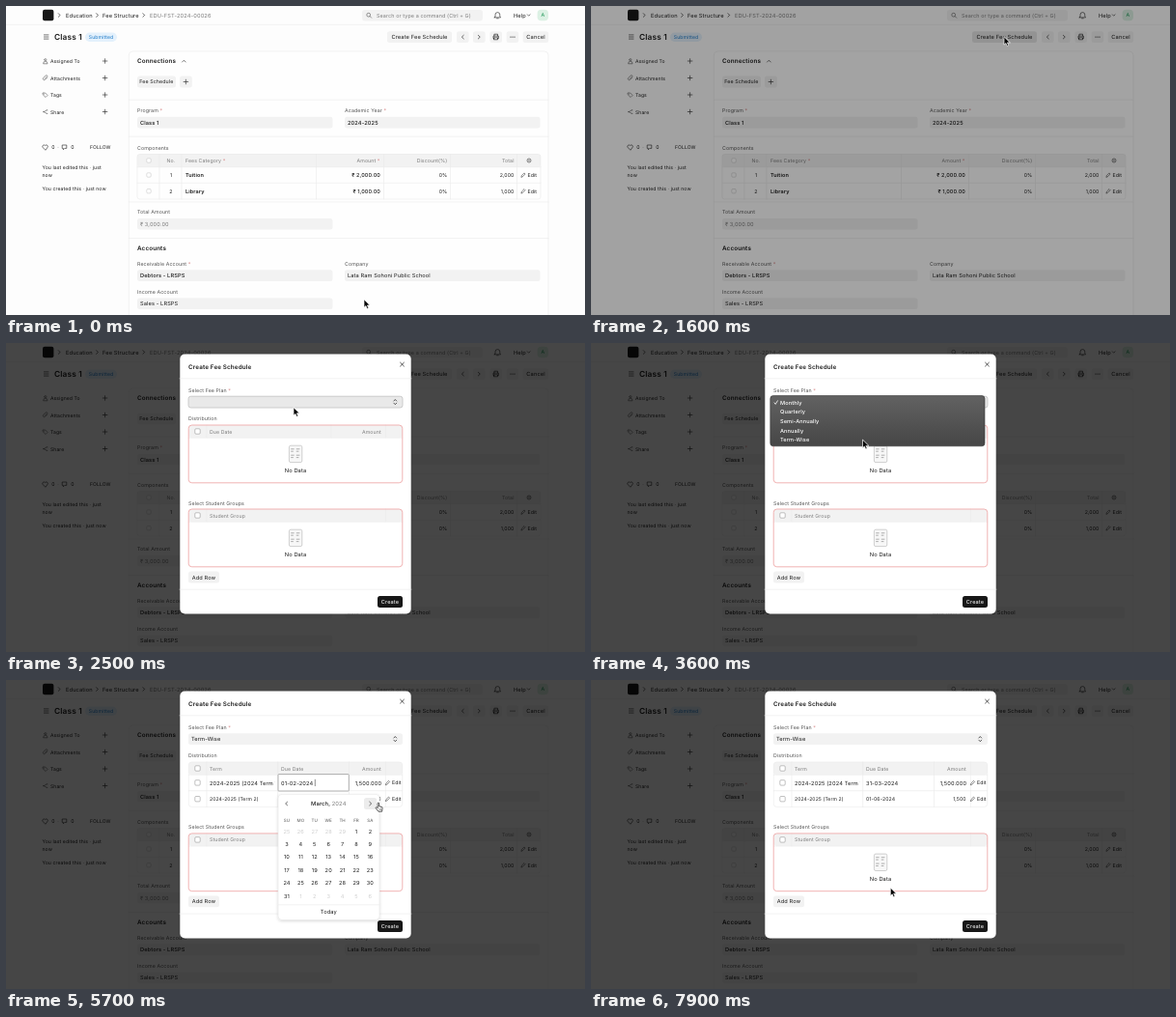
These frames come from a looping animation (600 px wide and 320 px high, 8000 ms). An HTML page:

```html
<!DOCTYPE html>
<html lang="en">
<head>
<meta charset="utf-8">
<title>Create Fee Schedule</title>
<style>
  html, body { margin: 0; width: 100%; height: 100%; overflow: hidden; background: #fdfdfd; }
  svg { display: block; width: 600px; height: 320px; }
  text { font-family: Inter, "Noto Sans", sans-serif; letter-spacing: .02em; text-rendering: geometricPrecision; white-space: pre; }
</style>
</head>
<body>
<svg id="stage" viewBox="0 0 600 320" xmlns="http://www.w3.org/2000/svg"></svg>
<script>
const INK = '#1c1c1c', MUTED = '#7c7c7c', LABEL = '#525252';
const FILL = '#f2f2f2', LINE = '#e9e9e9', PINK = '#eeA0a0';
const LOOP = 8000, STEP = 100;

// Drawing helpers, each returning SVG markup
const text = (x, y, s, size = 5.25, fill = INK, weight = 400, anchor = 'start') =>
  `<text x="${x}" y="${y}" font-size="${size}" fill="${fill}" font-weight="${weight}" text-anchor="${anchor}">${s}</text>`;
const right = (x, y, s, size, fill, weight) => text(x, y, s, size, fill, weight, 'end');
const mid = (x, y, s, size, fill, weight) => text(x, y, s, size, fill, weight, 'middle');
const box = (x, y, w, h, fill = FILL, r = 2.5, stroke = 'none', sw = .6) =>
  `<rect x="${x}" y="${y}" width="${w}" height="${h}" rx="${r}" fill="${fill}" stroke="${stroke}" stroke-width="${sw}"/>`;
const path = (d, stroke = INK, sw = .6, fill = 'none') =>
  `<path d="${d}" stroke="${stroke}" stroke-width="${sw}" fill="${fill}" stroke-linecap="round" stroke-linejoin="round"/>`;
const group = (id, body, attrs = '') => `<g id="${id}" ${attrs}>${body}</g>`;
const star = ' <tspan fill="#d98c8c">*</tspan>';
const hline = (x1, x2, y) => path(`M${x1} ${y}H${x2}`, LINE, .6);
const vline = (x, y1, y2) => path(`M${x} ${y1}V${y2}`, LINE, .6);
const plus = (x, y, r = 2.3) => path(`M${x - r} ${y}h${2 * r}M${x} ${y - r}v${2 * r}`, INK, .6);
const chevron = (x, y, dx, stroke = INK) => path(`M${x - dx / 2} ${y - 1.8}l${dx} 1.8l${-dx} 1.8`, stroke, .65);
const check = (x, y, s, stroke = '#8d8d8d') => box(x - s / 2, y - s / 2, s, s, '#fff', 1.1, stroke, .55);
const label = (x, y, s) => text(x, y, s, 5.25, LABEL);
const edit = (x, y) =>
  path(`M${x - 2} ${y + 2}l.4 -1.5l2.6 -2.6l1.1 1.1l-2.6 2.6z`, INK, .5) + text(x + 4.5, y + 2, 'Edit', 5.2);
const field = (x, y, s, fill = INK, weight = 400) =>
  box(x, y, 202.5, 11.6) + text(x + 3, y + 7.9, s, 5.65, fill, weight);

function header() {
  return box(38, 3.8, 11.4, 11.4, '#171717', 2) +
    chevron(55.2, 9.5, 1.8) + text(62, 11.6, 'Education', 5.7) +
    chevron(94.5, 9.5, 1.8) + text(100, 11.6, 'Fee Structure', 5.7) +
    chevron(142.8, 9.5, 1.8) + text(149, 11.6, 'EDU-FST-2024-00026', 5.7, MUTED) +
    box(369, 4, 125, 11.4, FILL, 3) +
    `<circle cx="375.7" cy="9.2" r="1.9" fill="none" stroke="${LABEL}" stroke-width=".6"/>` +
    path('M377.1 10.6l1.6 1.6', LABEL) + text(384, 11.6, 'Search or type a command (Ctrl + G)', 5.4, MUTED) +
    path('M507 10.9v-1.9a2.3 2.3 0 0 1 4.8 0v1.9l.8 1h-6.4zM508.6 12.8h1.6') +
    text(526, 11.6, 'Help', 5.7) + path('M540.3 8.8l1.4 1.4l1.4 -1.4') +
    box(550.6, 3.8, 11.4, 11.4, '#dcf1e4', 4) + mid(556.3, 11.4, 'A', 5.2, '#2f9e63', 500) +
    hline(0, 600, 19.3);
}

function titleBar() {
  const iconButtons = [467, 484, 501.4, 518.6].map(x => box(x, 26.2, 12.6, 11.8)).join('');
  const dots = [-2, 0, 2].map(d => `<circle cx="${525 + d}" cy="32.1" r=".55" fill="${INK}"/>`).join('');
  return [29.9, 32, 34.1].map(y => path(`M39.4 ${y}h4.6`)).join('') +
    text(50, 35.2, 'Class 1', 8.3, INK, 600) +
    box(82, 27.6, 33, 9.4, '#e4f1fc', 4.7) + mid(98.5, 34.1, 'Submitted', 5.1, '#1a78c8', 420) +
    group('createButton', box(395, 26.2, 67, 11.8)) + mid(428.5, 34.1, 'Create Fee Schedule', 5.7, INK, 420) +
    iconButtons + chevron(473.3, 32.1, -1.9) + chevron(490.3, 32.1, 1.9) +
    path('M505.9 31v-1.8h3.6v1.8M505.9 33.6h-.9v-2.5h5.4v2.5h-.9M505.9 32.8h3.6v2h-3.6z', INK, .65) + dots +
    box(535.6, 26.2, 26.6, 11.8) + mid(549, 34.1, 'Cancel', 5.7, INK, 420);
}

function sidebar() {
  const icons = [
    'M38.6 59.4a2.2 2.2 0 0 1 4.4 0zM39.7 55.7a1.1 1.1 0 1 0 2.2 0a1.1 1.1 0 1 0 -2.2 0',
    'M42.8 74l-2.3 2.3a1.2 1.2 0 0 1 -1.8 -1.8l2.6 -2.6a.8 .8 0 0 1 1.2 1.2l-2.3 2.3',
    'M38.4 90h2.2l2.5 2.5l-2 2l-2.7 -2.5zM39.5 91.2h.1',
    'M39.2 109.6l3 -1.7M39.2 109.6l3 1.7M38.4 109.6h.8M42.2 107.9h.7M42.2 111.3h.7'
  ];
  const rows = ['Assigned To', 'Attachments', 'Tags', 'Share'].map((s, i) => {
    const y = 57 + 17.5 * i;
    return path(icons[i], LABEL) + text(46, y + 2, s, 5.05) + plus(102.6, y);
  }).join('');
  return rows + path('M40.6 149l-2.4 -2.5a1.5 1.5 0 0 1 2.4 -2a1.5 1.5 0 0 1 2.4 2z') +
    text(47.2, 148, '0', 5.2) + text(53.3, 148, '·', 5.2) +
    path('M58.6 144h4.2v3.4h-2l-1.4 1.4v-1.4h-.8z') + text(67.3, 148, '0', 5.2) +
    text(87, 148, 'FOLLOW', 5) +
    text(37.5, 169, 'You last edited this · just', 5.1) + text(37.5, 176.8, 'now', 5.1) +
    text(37.5, 191, 'You created this · just now', 5.1);
}

function components() {
  const row = (y, n, name, amount, total) =>
    check(148, y, 4.4, '#c4c4c4') + mid(171, y + 2, n, 5.2) + text(186, y + 2, name, 5.5, INK, 600) +
    right(388, y + 2, '₹ ' + amount, 5.5, INK, 500) + right(457.3, y + 2, '0%', 5.2) +
    right(526.5, y + 2, total, 5.2) + edit(536, y);
  return label(136, 148.6, 'Components') +
    box(136, 153.5, 418, 13.2, FILL, 2) + box(136, 153.5, 418, 46.5, 'none', 2.5, LINE) +
    [159, 182, 321.5, 391.5, 460.5, 529.5].map(x => vline(x, 153.5, 200)).join('') +
    hline(136, 554, 166.7) + hline(136, 554, 183.3) +
    check(148, 160, 4.4, '#c4c4c4') + mid(171, 162, 'No.', 5.2, MUTED) +
    text(186, 162, 'Fees Category' + star, 5.2, MUTED) + right(387.5, 162, 'Amount' + star, 5.2, MUTED) +
    right(457.3, 162, 'Discount(%)', 5.2, MUTED) + right(526.5, 162, 'Total', 5.2, MUTED) +
    `<circle cx="542" cy="160" r="2" fill="none" stroke="${LABEL}" stroke-width=".7"/><circle cx="542" cy="160" r=".7" fill="${LABEL}"/>` +
    row(175, '1', 'Tuition', '2,000.00', '2,000') + row(191.7, '2', 'Library', '1,000.00', '1,000');
}

function card() {
  return box(127.3, 47, 434.7, 290, '#fefefe', 4, LINE) +
    [97.2, 135.2, 203, 240.6].map(y => hline(127.3, 562, y)).join('') +
    text(136, 59.2, 'Connections', 6.3, INK, 600) + path('M182.6 58l1.8 -1.8l1.8 1.8') +
    box(136, 72.6, 40, 11.8) + mid(155.8, 80.4, 'Fee Schedule', 5.3) +
    box(180, 72.6, 12.8, 11.8) + plus(186.4, 78.5) +
    label(136, 110, 'Program' + star) + field(136, 114.8, 'Class 1', INK, 500) +
    label(351, 110, 'Academic Year' + star) + field(351, 114.8, '2024-2025', INK, 500) +
    components() +
    label(136, 215.4, 'Total Amount') + field(136, 220, '₹ 3,000.00', MUTED) +
    text(136, 252.8, 'Accounts', 6.3, INK, 600) +
    label(136, 269, 'Receivable Account' + star) + field(136, 273.3, 'Debtors - LRSPS', INK, 500) +
    label(351, 269, 'Company') + field(351, 273.3, 'Lata Ram Sohoni Public School') +
    label(136, 298, 'Income Account') + field(136, 302.5, 'Sales - LRSPS');
}

// Header strip of a modal table
const gridHead = y => box(189.3, y, 221.4, 13.2, FILL, 3) + hline(189.3, 410.7, y + 13.2) + check(198.5, y + 6.5, 5.4);

function emptyGrid(y, cells) {
  const iy = y + 21.2;
  const marks = [3.6, 10].map(d =>
    path(`M295.6 ${iy + d}h2.6M295.6 ${iy + d + 2.4}h1.8M301.2 ${iy + d}h2.8M301.2 ${iy + d + 2.4}h1.8`, '#a5a5a5', .9)).join('');
  return gridHead(y) + cells + box(189.2, y, 221.6, 59.8, 'none', 3.5, PINK, .8) +
    box(293.4, iy, 13.4, 17.4, '#f7f7f7', 1.6, '#bdbdbd', .7) + marks +
    mid(300, y + 48.8, 'No Data', 5.7);
}

function termGrid() {
  const row = (y, term, due) => text(211, y + 2, term, 5.05) + text(285, y + 2, due, 5.15) + right(388.7, y + 2, '1,500', 5.15);
  return gridHead(85) + box(189.3, 85, 221.4, 46.4, 'none', 3, LINE) +
    [208, 281.7, 355.5, 393.3].map(x => vline(x, 85, 131.4)).join('') + hline(189.3, 410.7, 114.7) +
    text(211, 93.5, 'Term', 5.2, MUTED) + text(285, 93.5, 'Due Date', 5.2, MUTED) + right(388.7, 93.5, 'Amount', 5.2, MUTED) +
    [106.4, 123.2].map(y => check(198.5, y, 5.4) + edit(395.5, y)).join('') +
    group('rowRead', row(106.4, '2024-2025 (2024 Term 1)', '01-02-2024')) +
    group('rowEdit',
      `<svg x="208" y="98" width="70.5" height="17" viewBox="208 98 70.5 17">${text(211, 108.6, '2024-2025 (2024 Term 1)', 5.7)}</svg>` +
      right(389.2, 108.6, '1,500.000', 5.7) +
      group('focusBox', box(282, 97.6, 73.3, 17.4, '#fff', .8, '#8f8f8f', .7)) +
      group('oldDate', text(285, 108.6, '01-02-2024', 5.7) + path('M320.3 103.2v6.4', INK, .5)) +
      group('newDate', text(285, 108.6, '31-03-2024', 5.7))) +
    row(123.2, '2024-2025 (Term 2)', '01-06-2024');
}

function planMenu() {
  const items = ['Monthly', 'Quarterly', 'Semi-Annually', 'Annually', 'Term-Wise'];
  return box(185.8, 54.6, 222.2, 52.2, 'url(#menuFill)', 3, '#333', .6) +
    path('M190 61.9l1.2 1.5l2.2 -3.6', '#fff', .8) +
    items.map((s, i) => text(196, 63.8 + 9.57 * i, s, 5.6, '#fff', 450)).join('');
}

// Calendar month; "lead" is the number of days shown from the month before
function month(id, name, days, lead, prevDays, picked) {
  const rows = Math.ceil((lead + days) / 7), end = 164.8 + 13.4 * (rows - 1);
  let s = box(282, 118.3, 105, end - 118.3 + 16.7, '#fff', 4, '#dedede', .5) +
    mid(334.3, 130, `${name}, <tspan fill="${MUTED}" font-weight="400">2024</tspan>`, 5.8, INK, 500);
  ['SU', 'MO', 'TU', 'WE', 'TH', 'FR', 'SA'].forEach((d, i) => s += mid(291 + 14.4 * i, 146.6, d, 4.5, LABEL));
  for (let i = 0; i < rows * 7; i++) {
    const day = i - lead + 1, inside = day > 0 && day <= days;
    const n = inside ? day : day < 1 ? day + prevDays : day - days;
    const x = 291 + 14.4 * (i % 7), y = 158.6 + 13.38 * Math.floor(i / 7), on = inside && day === picked;
    if (on) s += box(x - 6.6, y - 8.2, 13.2, 12.4, '#171717', 2.5);
    s += mid(x, y, n, 5.6, on ? '#fff' : inside ? INK : '#cfcfcf');
  }
  s += hline(282, 387, end + 1) + mid(334.3, end + 10.4, 'Today', 5.7);
  return group(id, s, 'filter="url(#soft)"');
}

function modal() {
  const lower = label(189, 167.5, 'Select Student Groups') +
    emptyGrid(172, text(211, 180.6, 'Student Group', 5.2, MUTED) + vline(208, 172, 185) + vline(393.3, 172, 185)) +
    box(189, 236.6, 32, 11.8) + mid(205, 244.5, 'Add Row', 5.6, INK, 420) + hline(180, 420, 255.2) +
    box(385, 262, 26, 12, '#171717', 2.5) + mid(398, 270, 'Create', 5.6, '#fff', 420);
  return `<rect id="panel" x="180.3" y="11.5" width="239.4" height="269" rx="5" fill="#fff"/>` +
    text(189, 26.7, 'Create Fee Schedule', 6.3, INK, 600) + path('M408.6 20.2l3.8 3.8M412.4 20.2l-3.8 3.8', INK, .75) +
    hline(180, 420, 36.8) + label(189, 50.5, 'Select Fee Plan' + star) +
    box(189, 55.2, 222, 11.8) + group('planFocus', box(189, 55.2, 222, 11.8, '#e9e9e9', 2.5, '#c2c2c2', .8)) +
    path('M401.9 60l1.4 -1.5l1.4 1.5M401.9 62.2l1.4 1.5l1.4 -1.5', INK, .7) +
    group('planValue', text(192, 63.1, 'Term-Wise', 5.7)) + label(189, 79.8, 'Distribution') +
    group('noTerms', emptyGrid(85, text(211, 93.5, 'Due Date', 5.2, MUTED) + right(388.7, 93.5, 'Amount', 5.2, MUTED) +
      [208, 337, 393.3].map(x => vline(x, 85, 98)).join(''))) +
    group('terms', termGrid()) + group('lower', lower) + group('menu', planMenu()) +
    month('feb', 'February', 29, 4, 31, 1) + month('mar', 'March', 31, 5, 29, 0) +
    group('nav', group('nextHover', box(371, 121.9, 13.2, 12.2, '#ececec')) +
      chevron(290.6, 128, -1.9) + chevron(377.7, 128, 1.9));
}

const arrow = path('M0 0V8.2L1.9 6.5L3.2 9.4L4.7 8.7L3.4 5.9H6z', '#fff', .7, '#000');
const hand = path('M2 .9a.8 .8 0 0 1 1.6 0V3.8l2.6 .6a1.1 1.1 0 0 1 .9 1.2L6.6 9.2H2.9L.4 5.9a.7 .7 0 0 1 1 -1L2 5.4z', '#111', .7, '#fff') +
  path('M4 6.2v1.6M5.4 6.2v1.6', '#111', .4);

document.getElementById('stage').innerHTML =
  `<defs><linearGradient id="menuFill" x2="0" y2="1"><stop stop-color="#626262"/><stop offset="1" stop-color="#464646"/></linearGradient>
   <filter id="soft" x="-10%" y="-10%" width="120%" height="120%"><feDropShadow dx="0" dy="1" stdDeviation="1.4" flood-opacity=".16"/></filter></defs>` +
  box(0, 0, 600, 320, '#fdfdfd', 0) + header() + titleBar() + sidebar() + card() +
  '<rect id="shade" width="600" height="320" fill="#000"/>' + group('modal', modal()) +
  group('cursor', group('arrow', arrow) + group('hand', hand));

const $ = Object.fromEntries([...document.querySelectorAll('[id]')].map(e => [e.id, e]));

// Pointer tip: time, x, y
const route = [
  [0, 371, 304], [100, 371, 304], [700, 428, 32], [1800, 428, 32], [2400, 298, 67], [2900, 298, 66],
  [3500, 281.5, 100.5], [3800, 281.5, 100.5], [4000, 284.5, 100.7], [4700, 288, 103],
  [5500, 383, 127], [5900, 383, 127], [6500, 289, 218], [6900, 289, 218],
  [7300, 330.5, 125.5], [7400, 330.5, 125.5], [7800, 310.3, 215.3], [LOOP, 310.3, 215.3]
];
// Visible spans of the parts that switch on and off
const spans = {
  modal: [1700, LOOP], planFocus: [1700, 4300], menu: [3000, 3700], planValue: [3700, LOOP],
  noTerms: [0, 3900], terms: [3900, LOOP], rowRead: [0, 4300], rowEdit: [4300, LOOP],
  focusBox: [4300, 7300], oldDate: [4300, 6800], newDate: [6800, LOOP],
  feb: [4500, 5700], mar: [5700, 6800], nav: [4500, 6800], nextHover: [5300, 6000], hand: [3900, 6900]
};

const clamp = v => Math.min(1, Math.max(0, v));
const ease = p => p * p * (3 - 2 * p);

function pointerAt(t) {
  const i = route.findIndex(p => p[0] > t);
  const [t0, x0, y0] = route[i - 1], [t1, x1, y1] = route[i];
  const p = ease((t - t0) / (t1 - t0));
  return [x0 + (x1 - x0) * p, y0 + (y1 - y0) * p];
}

function draw(t) {
  for (const id in spans) $[id].style.display = t >= spans[id][0] && t < spans[id][1] ? '' : 'none';
  $.arrow.style.display = $.hand.style.display === 'none' ? '' : 'none';
  $.createButton.firstChild.setAttribute('fill', t >= 700 && t < 1900 ? '#e6e6e6' : FILL);
  $.shade.setAttribute('opacity', .72 * clamp((t - 1500) / 200));
  const enter = clamp((t - 1600) / 300);
  $.modal.setAttribute('opacity', enter);
  $.modal.setAttribute('transform', `translate(0 ${-14 * (1 - enter)})`);
  const lift = t >= 3900 ? 13.1 : 0;
  $.panel.setAttribute('height', 269 - lift);
  $.lower.setAttribute('transform', `translate(0 ${-lift})`);
  $.cursor.setAttribute('transform', `translate(${pointerAt(t)})`);
}

const start = performance.now();
function tick() {
  const t = (performance.now() - start) % LOOP;
  draw(Math.floor(t / STEP) * STEP);
  requestAnimationFrame(tick);
}
tick();
</script>
</body>
</html>
```
